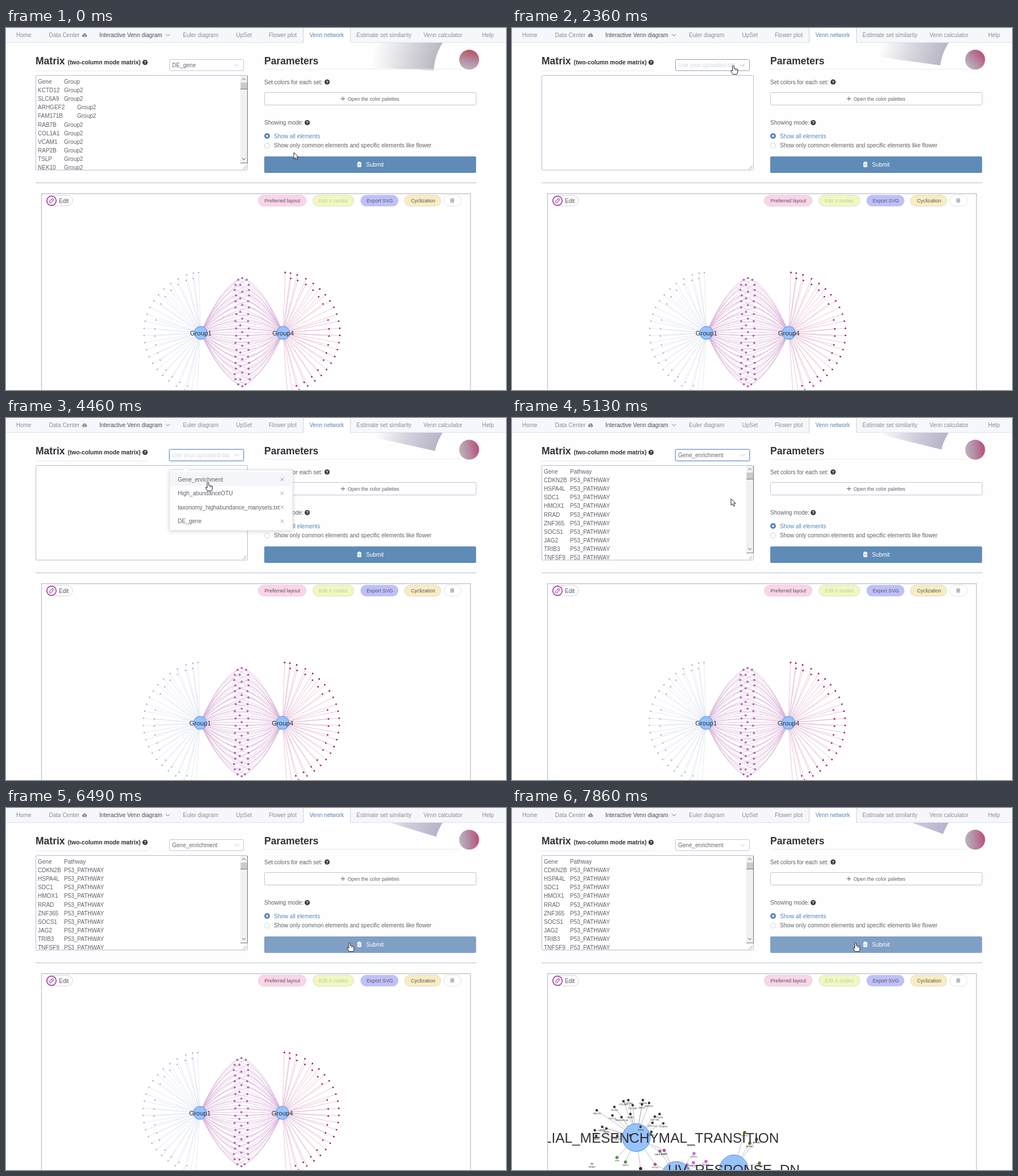
Animation of 879 by 637 pixels, one loop 8 s. Source, as an HTML page with a canvas:

```html
<!DOCTYPE html>
<html lang="en">
<head>
<meta charset="utf-8">
<title>Venn network</title>
<style>
html, body { margin: 0; width: 100%; height: 100%; overflow: hidden; background: #fff; }
canvas { display: block; }
</style>
</head>
<body>
<canvas id="stage" width="879" height="637"></canvas>
<script>
const g = document.getElementById('stage').getContext('2d');
const FONT = '"Liberation Sans", Arial, sans-serif';
const RAD = Math.PI / 180;
const LOOP = 8000;
const STEPS = [0, 330, 650, 1000, 1350, 1670, 2030, 2360, 2720, 3070, 3390, 3740, 4090,
  4460, 4780, 5130, 5460, 5820, 6140, 6490, 6840, 7160, 7510, 7860];
const CLEARED = 1670, OPENED = 2720, PICKED = 4780, CLICKED = 6140, REBUILT = 7860;
const PATH = [[0, 506, 219], [330, 500, 208], [650, 460, 140], [1000, 407, 66], [1670, 407, 66],
  [2360, 389, 66], [2720, 389, 68], [3390, 374, 86], [4090, 356, 110], [4460, 355, 113],
  [4780, 355, 113], [5130, 385, 142], [5460, 510, 207], [5820, 603, 237], [6140, 604, 237]];

// ---------- helpers ----------
function text(s, x, y, color = '#5f6168', size = 10, weight = '', align = 'left') {
  g.font = `${weight} ${size}px ${FONT}`;
  g.textAlign = align;
  g.fillStyle = color;
  g.fillText(s, x, y);
}
function box(x, y, w, h, r, fill, stroke, lw = 1) {
  g.beginPath();
  g.roundRect(x, y, w, h, r);
  if (fill) { g.fillStyle = fill; g.fill(); }
  if (stroke) { g.strokeStyle = stroke; g.lineWidth = lw; g.stroke(); }
}
function dot(x, y, r, fill, stroke, lw = 1) {
  g.beginPath();
  g.arc(x, y, r, 0, 7);
  if (fill) { g.fillStyle = fill; g.fill(); }
  if (stroke) { g.strokeStyle = stroke; g.lineWidth = lw; g.stroke(); }
}
function line(color, lw, ...p) {
  g.beginPath();
  for (let i = 0; i < p.length; i += 2) g.lineTo(p[i], p[i + 1]);
  g.strokeStyle = color;
  g.lineWidth = lw;
  g.stroke();
}
function cross(x, y, r, color) {
  line(color, 0.9, x - r, y - r, x + r, y + r);
  line(color, 0.9, x + r, y - r, x - r, y + r);
}
function chevron(x, y, w, color, turn = 0) {
  g.save();
  g.translate(x, y);
  g.rotate(turn);
  line(color, 1, -w, -w / 2, 0, w / 2, w, -w / 2);
  g.restore();
}
function help(x, y) {
  dot(x, y, 4.5, '#34363c');
  text('?', x, y + 2.8, '#fff', 8, 'bold', 'center');
}
function clipTo(x, y, w, h, draw) {
  g.save();
  g.beginPath();
  g.rect(x, y, w, h);
  g.clip();
  draw();
  g.restore();
}

// ---------- page ----------
function ornament(t) {
  const cx = 850, cy = 79, inner = 98, outer = 205;
  const edge = Math.PI + (2.6 + 2.2 * t / 1000) * RAD;
  const tint = g.createRadialGradient(cx, cy, inner, cx, cy, outer);
  const k = t / LOOP;
  const rgb = `${186 - 4 * k}, ${184 - 5 * k}, ${194 + 10 * k}`;
  tint.addColorStop(0, `rgba(${rgb}, 1)`);
  tint.addColorStop(0.5, `rgba(${rgb}, ${0.5 + 0.2 * k})`);
  tint.addColorStop(1, `rgba(${rgb}, 0.04)`);
  g.beginPath();
  g.arc(cx, cy, outer, edge, edge + 1.2);
  g.arc(cx, cy, inner, edge + 1.2, edge, true);
  g.fillStyle = tint;
  g.fill();

  const a = (-75 + 70 * Math.min(1, t / 5000)) * RAD;
  const dx = 17 * Math.cos(a), dy = 17 * Math.sin(a);
  const ball = g.createLinearGradient(814 - dx, 56 - dy, 814 + dx, 56 + dy);
  ball.addColorStop(0, '#bab4be');
  ball.addColorStop(0.45, '#b58da4');
  ball.addColorStop(1, k < 0.08 ? '#bb5263' : '#b9517c');
  dot(814.2, 55.8, 17.5, ball);
}

function nav() {
  g.fillStyle = '#f5f7fb';
  g.fillRect(0, 0, 879, 25);
  line('#dde1ea', 1, 0, 25.5, 879, 25.5);
  g.fillStyle = '#fff';
  g.fillRect(523, 0, 82, 26);
  line('#c9d3e2', 1, 522.5, 0, 522.5, 25);
  line('#c9d3e2', 1, 605.5, 0, 605.5, 25);
  const items = [['Home', 18], ['Data Center', 75.5], ['Interactive Venn diagram', 164],
    ['Euler diagram', 311], ['UpSet', 404.5], ['Flower plot', 462], ['Venn network', 533.5],
    ['Estimate set similarity', 616], ['Venn calculator', 734], ['Help', 837]];
  items.forEach(([s, x], i) => text(s, x, 16, i === 2 ? '#4d4f57' : i === 6 ? '#5583b3' : '#8b8e97'));
  const gray = '#8b8e97';
  dot(135.8, 13.6, 2.2, gray);
  dot(138.2, 12, 2.8, gray);
  dot(140.4, 13.7, 2.1, gray);
  g.fillRect(135.8, 13, 4.6, 2.8);
  line('#fff', 0.9, 138, 15, 138, 11.5);
  chevron(284.5, 12.3, 3.5, '#6b6e76');
}

const DE_ROWS = ['Gene:Group', ...['KCTD12', 'SLC6A9', 'ARHGEF2', 'FAM171B', 'RAB7B', 'COL1A1',
  'VCAM1', 'RAP2B', 'TSLP', 'NEK10'].map(n => n + ':Group2')];
const PATH_ROWS = ['Gene:Pathway', ...['CDKN2B', 'HSPA4L', 'SDC1', 'HMOX1', 'RRAD', 'ZNF365',
  'SOCS1', 'JAG2', 'TRIB3', 'TNFSF9'].map(n => n + ':P53_PATHWAY')];

function matrix(rows) {
  box(52.5, 83.5, 372, 166.5, 2, '#fff', '#b4bcd3');
  for (let i = 0; i < 2; i++) line('#8d8f96', 0.8, 416 + 3 * i, 248.5, 422.5, 242 + 3 * i);
  if (!rows) return;
  clipTo(53, 84, 359, 166, () => rows.forEach((row, i) => {
    const [a, b] = row.split(':'), y = 98 + 15.1 * i;
    text(a, 56, y);
    text(b, a.length > 6 ? 125 : 102, y);
  }));
  g.fillStyle = '#f0f0f1';
  g.fillRect(412, 84, 12, 153);
  g.fillStyle = '#cacbcd';
  g.fillRect(412.5, 96, 11.5, 11);
  line('#74777f', 1, 412, 107.5, 424, 107.5);
  line('#74777f', 1, 424.5, 84, 424.5, 237.5, 412, 237.5);
  chevron(418, 90, 2.8, '#505258', Math.PI);
  chevron(418, 230.5, 2.8, '#505258');
}

function select(t) {
  const empty = t >= CLEARED && t < PICKED;
  const focus = t >= OPENED && t < CLICKED;
  if (focus) box(287.5, 55.5, 130, 20, 2, null, '#d5e4f5', 4);
  box(287.5, 55.5, 130, 19.5, 2, '#fff', focus ? '#6f98c5' : empty ? '#939cb7' : '#c2c6d0');
  const label = empty ? 'Use your uploaded dat' : t < CLEARED ? 'DE_gene' : 'Gene_enrichment';
  text(label, 292, 69, empty ? '#d3d6df' : '#65676f');
  if (t >= 1000 && t < CLEARED) {
    dot(405.5, 65.5, 4, null, '#b9bdc8', 0.9);
    cross(405.5, 65.5, 1.6, '#b9bdc8');
  } else {
    const turn = !empty || t < 2360 ? 0 : t < OPENED ? -0.35 : Math.PI;
    chevron(405.5, 65.5, 3.8, '#bcc1cc', turn);
  }
}

function dropdown(cursor) {
  g.save();
  g.shadowColor = 'rgba(0,0,0,.14)';
  g.shadowBlur = 7;
  g.shadowOffsetY = 1;
  box(287.5, 91.5, 216.5, 106.5, 2, '#fff', '#e1e4ea');
  g.restore();
  g.beginPath();
  g.moveTo(312, 92); g.lineTo(317, 87.5); g.lineTo(322, 92);
  g.fillStyle = '#fff';
  g.fill();
  ['Gene_enrichment', 'High_abundanceOTU', 'taxonomy_highabundance_manysets.txt', 'DE_gene']
    .forEach((s, i) => {
      const top = 95.5 + 24.5 * i;
      if (cursor.y >= top && cursor.y < top + 24.5) {
        g.fillStyle = '#f4f6fa';
        g.fillRect(288, top, 216, 24.5);
      }
      text(s, 302, top + 16);
      cross(485.5, top + 12.5, 2.7, '#888b94');
    });
}

function pill(x, w, fill, s, tx, color = '#55575f') {
  box(x + 0.5, 294, w - 1, 19.5, 10, fill, 'rgba(150,150,180,.28)');
  text(s, tx, 306.8, color, 8.8);
}

function parameters(t) {
  text('Parameters', 454, 64, '#2f3137', 17.5, 'bold');
  line('#e9ebf0', 1, 454, 72.5, 800, 72.5);
  text('Set colors for each set:', 454, 98.5);
  help(564.5, 95);
  box(454.5, 113.5, 372, 22, 2, '#fff', '#bfc5d6');
  line('#5f6168', 1, 588.5, 124.5, 596, 124.5);
  line('#5f6168', 1, 592.3, 120.8, 592.3, 128.2);
  text('Open the color palettes', 600.5, 127.7, '#5f6168', 8.8);
  text('Showing mode:', 454, 170);
  help(529.5, 166.5);
  dot(459, 190, 5, '#5a88b6');
  dot(459, 190, 1.8, '#fff');
  text('Show all elements', 471, 193.7, '#5a88b6');
  dot(459, 206.8, 4.6, '#fff', '#ccd1dd');
  text('Show only common elements and specific elements like flower', 471, 210.2);
  const tone = t >= CLICKED ? '#809fc5' : t >= 5820 ? '#577fa6' : '#5f8bb7';
  box(454, 226, 372.4, 29, 2, tone);
  box(617.7, 236.3, 6.8, 8.4, 1, '#fff');
  g.fillRect(619.4, 235.2, 3.4, 2);
  line(tone, 0.8, 619.2, 239.5, 623, 239.5);
  line(tone, 0.8, 619.2, 241.8, 623, 241.8);
  text('Submit', 633, 244, '#fff');
}

function toolbar() {
  box(71.5, 294.5, 45.5, 18.5, 9.5, '#fff', '#d3d3da');
  dot(80, 304, 8.2, '#fff', '#a746a8', 1.8);
  g.save();
  g.translate(80, 304);
  g.rotate(-45 * RAD);
  box(-4.5, -1.7, 9, 3.4, 1.5, null, '#a746a8');
  line('#a746a8', 0.8, 2, -1.7, 2, 1.7);
  g.restore();
  text('Edit', 93, 307.5, '#55575f');
  pill(443, 85, '#fbd4e8', 'Preferred layout', 454.5);
  pill(539, 73, '#f0f8bf', 'Edit X-nodes', 550, '#c3c8ae');
  pill(623, 67, '#bfc0fa', 'Export SVG', 634);
  pill(700, 65, '#f8edc1', 'Cyclization', 712);
  pill(769, 32, '#fff', '', 0);
  for (const y of [301, 303.5, 306]) line('#55575f', 1, 781.2, y, 787.8, y);
}

// ---------- two-group graph ----------
const INNER = [98, 105.5, 115, 125, 134.5, 144, 164, 175, 184, 195, 205, 214, 227, 237, 247, 256];
function fan() {
  const polar = (deg, r) => [r * Math.cos(deg * RAD), -r * Math.sin(deg * RAD)];
  const outer = [92, 97, 261, 266];
  for (let j = -9.5; j < 10; j++) outer.push(179 + j * (7.25 + 0.0075 * j * j));
  return [
    ...outer.map(d => polar(d, 99.8 + 6.5 * Math.sin(d * RAD) ** 8)),
    ...INNER.map(d => polar(d, 81 + 16 * Math.sin(d * RAD) ** 2))
  ];
}
function shared() {
  const list = [];
  for (let i = 0; i < 18; i++) {
    const u = (i - 8.5) / 8.5;
    const y = 535 + 92 * u + 5.5 * Math.sin(Math.PI * u);
    const end = Math.abs(u) === 1 ? 3 : 0;
    const spread = 10.7 + 2.2 * u * u - 2 * end;
    list.push([415 - spread + Math.sin(2.4 * i), y], [415.2 + spread + Math.cos(2.4 * i), y]);
    if (i < 17) list.push([413.6 + 1.7 * Math.cos(Math.PI * i), 440 + 11.9 * i]);
  }
  return list;
}
const FAN = fan(), SHARED = shared();

function groups(t) {
  const cy = 536.5, x1 = 342.4, x2 = 487.2;
  g.save();
  g.translate(-1.5 * Math.min(t, 6490) / 6490, 0);
  const sides = [[x1, 1, '#d8deee', '#a5b1de', 1.3], [x2, -1, '#dfaccb', '#a5185f', 1.45]];
  for (const [cx, dir, edge] of sides)
    for (const [x, y] of FAN) line(edge, 0.7, cx, cy, cx + dir * x, cy + y);
  g.strokeStyle = '#d6acd3';
  g.lineWidth = 0.68;
  for (const [x, y] of SHARED)
    for (const cx of [x1, x2]) {
      g.beginPath();
      g.moveTo(cx, cy);
      g.quadraticCurveTo((cx + x) / 2, (cy + y) / 2 + 0.32 * (y - cy), x, y);
      g.stroke();
    }
  for (const [cx, dir, , fill, r] of sides)
    for (const [x, y] of FAN) dot(cx + dir * x, cy + y, r, fill);
  for (const [x, y] of SHARED) dot(x, y, 1.5, '#b860b4', '#a04a9f', 0.6);
  [[x1, 'Group1'], [x2, 'Group4']].forEach(([x, s]) => {
    dot(x, cy, 11.5, '#97c2fc', '#4a90e0');
    text(s, x, 541, '#303238', 11.4, '', 'center');
  });
  g.restore();
}

// ---------- pathway graph ----------
const HUBS = [[218.5, 580, 25], [289, 647.5, 26], [390, 635.5, 25.5]];
const LEAVES = [
  ['#333', [0], [['TAGLN', 149, 532], ['RGS4', 180, 526], ['COL4A1', 196, 516], ['COL3A2', 204.5, 514],
    ['COL1A1', 212, 523], ['VEGFA', 230, 514], ['MEST', 228.5, 521.5], ['AREGP', 241, 519],
    ['TNFRSF11B', 192.5, 544], ['FSTL3', 176.5, 541], ['NNMT', 208, 538.5], ['FZD8', 259.5, 538.5],
    ['COL7A1', 251, 543], ['CXCL12', 247, 554], ['VCAM1', 266, 555], ['LAMA2', 158.5, 561],
    ['LUM', 145.5, 567], ['FBN1', 166, 564], ['GAS3', 148, 577], ['CALD1', 185, 577],
    ['FBN2', 226, 561], ['DAB2', 245, 570], ['', 208, 576]]],
  ['#49993d', [0], [['JUN', 184.5, 615], ['SDC1', 199.5, 623]]],
  ['#9c5e95', [0, 1], [['GADD45B', 260, 604], ['RHOB', 267.5, 602.5], ['PTGS', 251.5, 627]]],
  ['#4a2028', [0], [['', 226, 634.5]]],
  ['#d067ce', [1], [['CDH1', 320, 608], ['MAPK8', 319, 624], ['BTG2', 341, 622], ['FOS', 308, 628]]],
  ['#497a2c', [2], [['DBP1', 409, 571], ['APBB2', 418, 590], ['ANXA4', 430, 583], ['SNAI2', 435, 625]]]
];

function pathways() {
  for (const [, hubs, list] of LEAVES)
    for (const [, x, y] of list)
      for (const h of hubs) line('#a8a0a8', 0.7, HUBS[h][0], HUBS[h][1], x, y);
  for (const [x, y, r] of HUBS) dot(x, y, r - 0.5, '#97c2fc', '#4a90e0');
  for (const [color, , list] of LEAVES)
    for (const [s, x, y] of list) {
      dot(x, y, color === '#333' ? 2.2 : 2.8, color);
      text(s, x, y + 7.2, '#333', 4.2, '', 'center');
    }
  cross(140.5, 626, 2, '#49993d');
  line('#49993d', 0.9, 138, 626, 143, 626);
  text('RRAD', 140.5, 633, '#333', 4.2, '', 'center');
  text('EPITHELIAL_MESENCHYMAL_TRANSITION', 218.5, 589, '#303034', 24.4, '', 'center');
  text('UV_RESPONSE_DN', 390, 644.5, '#303034', 24.4, '', 'center');
}

// ---------- pointer ----------
function pointerAt(t) {
  let i = 0;
  while (i < PATH.length - 2 && t >= PATH[i + 1][0]) i++;
  const [t0, x0, y0] = PATH[i], [t1, x1, y1] = PATH[i + 1];
  const k = Math.min(1, (t - t0) / (t1 - t0));
  return { x: x0 + (x1 - x0) * k, y: y0 + (y1 - y0) * k };
}
const ARROW = new Path2D('M0 0V11.5L2.7 9L4.6 13.2L6.6 12.3L4.8 8.2H8.2Z');
const HAND = new Path2D('M-1.3 .8Q0 -.8 1.3 .8V5.5Q2.6 4.6 3.6 5.8Q5 5.2 5.8 6.5Q7.8 6 7.8 8V11' +
  'Q7.6 13 6.3 15.5H-.8L-3.8 10.5Q-4.6 8.6-3 8.5L-1.3 10Z');
function pointer({ x, y }, hand) {
  g.save();
  g.translate(x, y);
  g.fillStyle = '#fff';
  g.strokeStyle = '#22242a';
  g.lineWidth = 1;
  g.lineJoin = 'round';
  g.fill(hand ? HAND : ARROW);
  g.stroke(hand ? HAND : ARROW);
  if (hand) {
    line('#22242a', 0.7, 3.6, 6, 3.6, 9);
    line('#22242a', 0.7, 5.8, 6.8, 5.8, 9.2);
  }
  g.restore();
}

function draw(t) {
  const cursor = pointerAt(t);
  g.fillStyle = '#fefefe';
  g.fillRect(0, 0, 879, 637);
  ornament(t);
  nav();
  text('Matrix', 52, 64, '#2f3137', 17.5, 'bold');
  text('(two-column mode matrix)', 108.5, 64, '#2f3137', 10.25, 'bold');
  help(244.5, 60.5);
  line('#e9ebf0', 1, 52, 75.5, 250, 75.5);
  matrix(t < CLEARED ? DE_ROWS : t < PICKED ? null : PATH_ROWS);
  select(t);
  parameters(t);
  line('#b3bfd3', 1, 52, 272.5, 827, 272.5);
  box(62.5, 291.5, 754, 360, 0, '#fff', '#c4c5c9', 1.4);
  clipTo(63, 292, 753, 345, () => t < REBUILT ? groups(t) : pathways());
  toolbar();
  if (t >= OPENED && t < PICKED) dropdown(cursor);
  pointer(cursor, (t >= 1000 && t <= PICKED) || t >= CLICKED);
}

let shown = -1;
function tick() {
  const now = performance.now() % LOOP;
  const step = STEPS.findLast(s => s <= now);
  if (step !== shown) draw(shown = step);
  requestAnimationFrame(tick);
}
tick();
</script>
</body>
</html>
```
